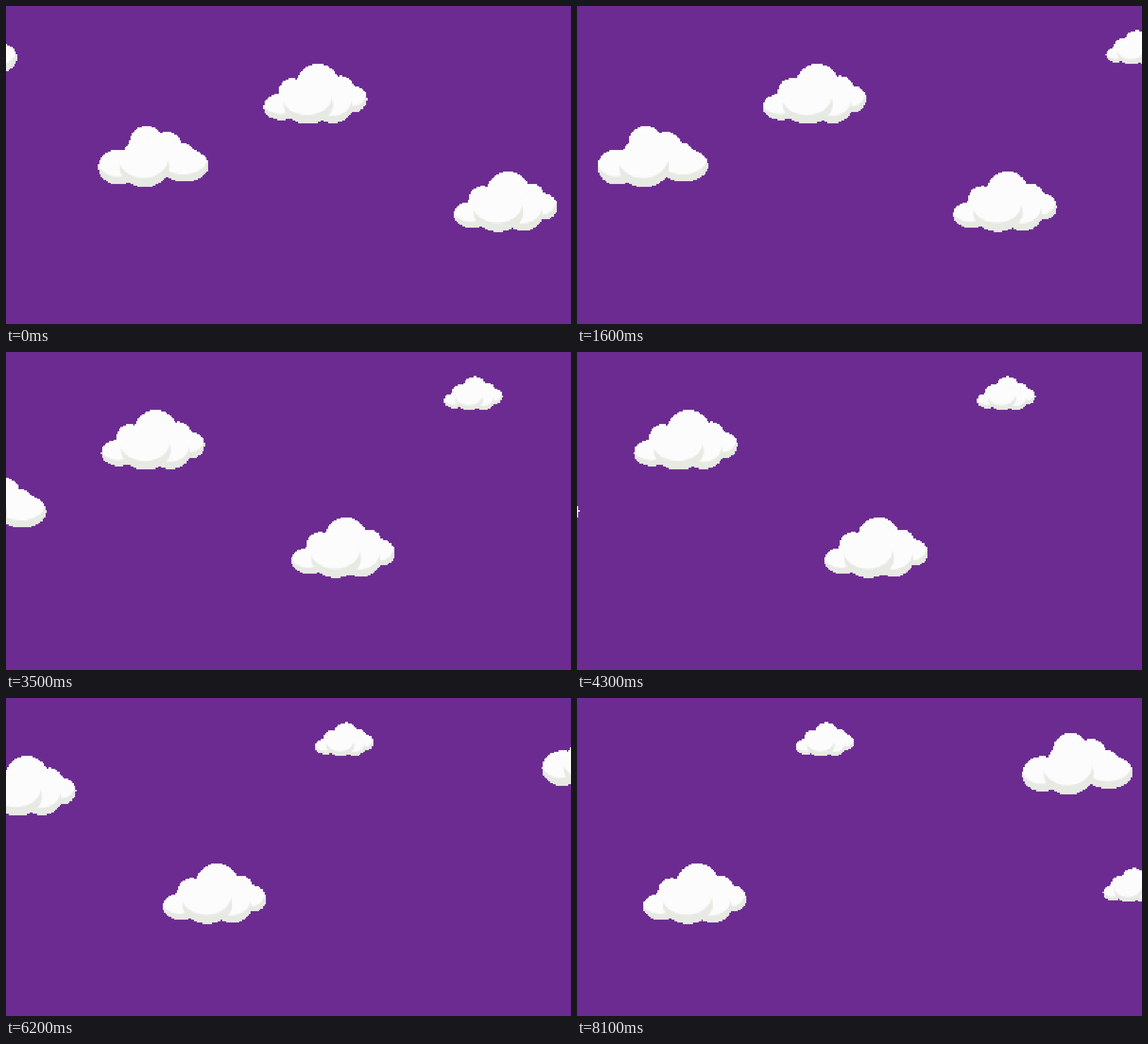
These frames come from a looping animation (998 px wide and 561 px high, 8.2 s). An HTML page with a canvas:

```html
<!DOCTYPE html>
<html lang="en">
<head>
<meta charset="utf-8">
<title>Clouds</title>
<style>
  html, body { margin: 0; width: 100%; height: 100%; overflow: hidden; background: #6c2b91; }
  canvas { display: block; width: 998px; height: 561px; image-rendering: pixelated; }
</style>
</head>
<body>
<canvas width="400" height="225"></canvas>
<script>
const LOOP = 8200, STEP = 8.43;
const canvas = document.querySelector('canvas');
const ctx = canvas.getContext('2d', { willReadFrequently: true });
const sx = canvas.width / 998, sy = canvas.height / 561;

// Puffs from back to front: centre x, y and radii.
const wide = [
  [95, 38, 38, 38], [50, 50, 25, 25], [135, 45, 24, 24], [157, 62, 25, 24],
  [31, 76, 32, 24], [122, 76, 34, 29], [78, 72, 44, 34]
];
const tall = [
  [85, 28, 30, 28], [121, 36, 27, 26], [150, 50, 20, 20], [72, 50, 27, 27],
  [152, 69, 43, 29], [35, 72, 35, 31], [82, 72, 44, 36]
];

const clouds = [
  { puffs: tall, x: -175, y: 22 },
  { puffs: tall, x: 163, y: 212 },
  { puffs: wide, x: 456, y: 102 },
  { puffs: wide, x: 792, y: 292 },
  { puffs: wide, x: 1061, y: 43, size: 0.565 },
  { puffs: tall, x: 1461, y: 20, sink: 0.525 },
  { puffs: wide, x: 1604, y: 300, size: 0.565 }
];

function oval(x, y, rx, ry, color, mode) {
  ctx.globalCompositeOperation = mode;
  ctx.fillStyle = color;
  ctx.beginPath();
  ctx.ellipse(x, y, rx, ry, 0, 0, 7);
  ctx.fill();
}

// Each puff is grey with a lifted white copy, leaving a crescent of shade.
function drawCloud({ puffs, x, y, size = 1, sink = 0 }, step) {
  ctx.setTransform(sx * size, 0, 0, sy * size, sx * (x - step * STEP), sy * (y + step * sink));
  for (const [px, py, rx, ry] of puffs) {
    oval(px, py, rx, ry, '#e7e9e3', 'source-over');
    oval(px - 2, py - ry * 0.45, rx, ry, '#fcfcfc', 'source-atop');
  }
}

// Turn soft outlines into hard pixel steps.
function sharpen() {
  const img = ctx.getImageData(0, 0, canvas.width, canvas.height);
  for (let i = 3; i < img.data.length; i += 4) img.data[i] = img.data[i] > 127 ? 255 : 0;
  ctx.putImageData(img, 0, 0);
}

let last = -1;
function tick() {
  const step = Math.max(0, Math.floor(performance.now() % LOOP / 100) - 1);
  if (step !== last) {
    last = step;
    ctx.resetTransform();
    ctx.clearRect(0, 0, canvas.width, canvas.height);
    clouds.forEach(cloud => drawCloud(cloud, step));
    sharpen();
  }
  requestAnimationFrame(tick);
}
tick();
</script>
</body>
</html>
```
